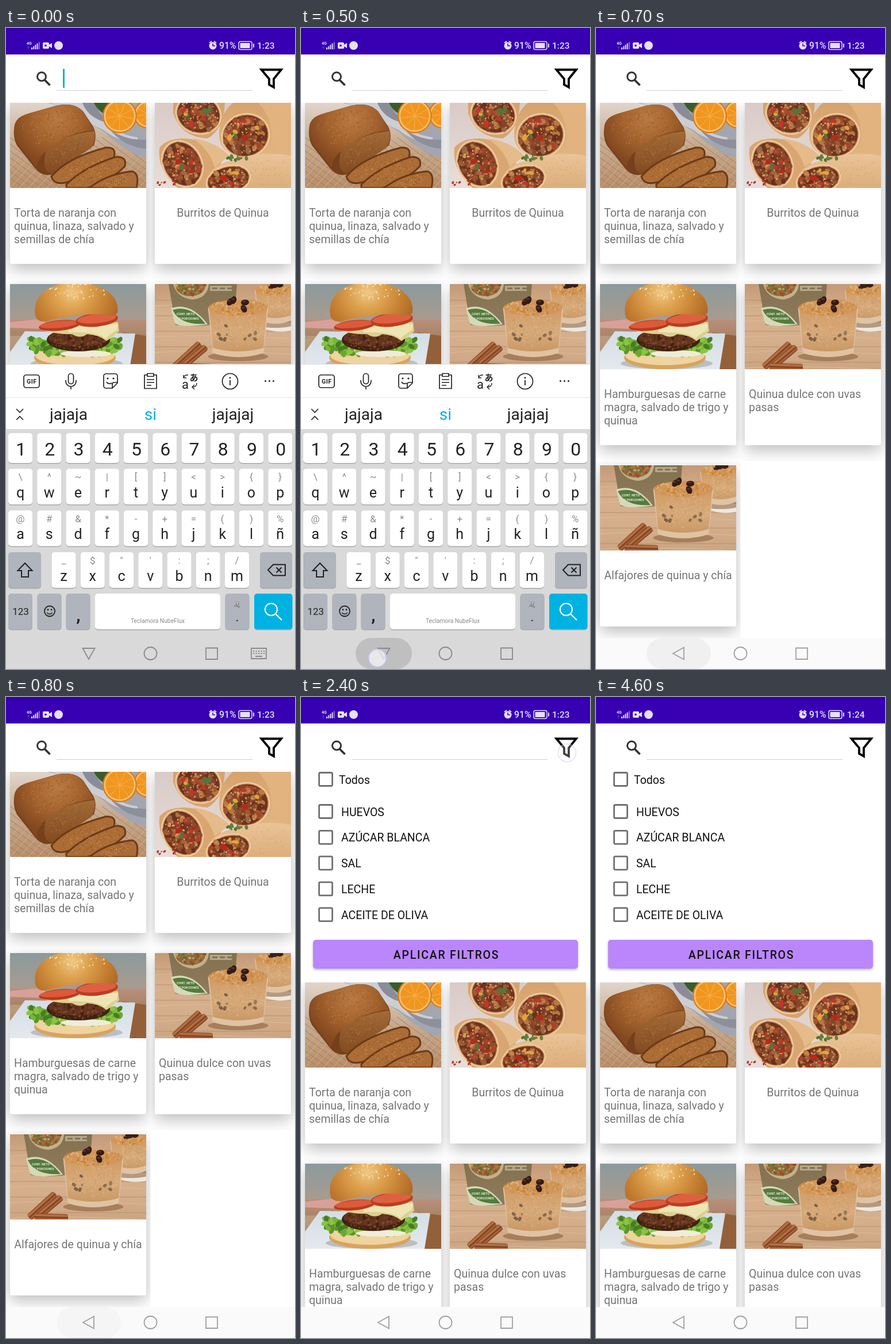
These frames come from a looping animation (503x1114 px, 5000 ms). An HTML page with a canvas:

```html
<!DOCTYPE html>
<html lang="es">
<head>
<meta charset="utf-8">
<title>Recetas</title>
<style>
html, body { margin: 0; width: 100%; height: 100%; overflow: hidden; background: #fff; }
canvas { display: block; width: 503px; height: 1114px; }
</style>
</head>
<body>
<canvas id="stage" width="503" height="1114"></canvas>
<script>
const screen2d = document.getElementById('stage').getContext('2d');
const LOOP = 5000, CYAN = '#00b2e2', INK = '#222';
let g = screen2d;

let seed = 11;
const rand = () => (seed = seed * 16807 % 2147483647) / 2147483647;
const pick = list => list[Math.floor(rand() * list.length)];

function rect(color, x, y, w, h, r = 0) {
  g.fillStyle = color;
  g.beginPath();
  g.roundRect(x, y, w, h, r);
  g.fill();
}
function oval(color, x, y, rx, ry = rx, turn = 0) {
  g.fillStyle = color;
  g.beginPath();
  g.ellipse(x, y, rx, ry, turn, 0, 7);
  g.fill();
}
function ring(color, width, x, y, r) {
  g.strokeStyle = color;
  g.lineWidth = width;
  g.beginPath();
  g.arc(x, y, r, 0, 7);
  g.stroke();
}
function line(path, color = INK, width = 1.7) {
  g.strokeStyle = color;
  g.lineWidth = width;
  g.stroke(new Path2D(path));
}
function shape(path, color) {
  g.fillStyle = color;
  g.fill(new Path2D(path));
}
function text(str, x, y, size, color, align = 'left', weight = 400, spacing = 0) {
  g.font = `${weight} ${size}px Roboto, "Noto Sans CJK JP", sans-serif`;
  g.fillStyle = color;
  g.textAlign = align;
  g.letterSpacing = spacing + 'px';
  g.fillText(str, x, y);
}
function fade(y0, y1, ...colors) {
  const f = g.createLinearGradient(0, y0, 0, y1);
  colors.forEach((c, i) => f.addColorStop(i / (colors.length - 1), c));
  return f;
}
function glow(x, y, r, ...colors) {
  const f = g.createRadialGradient(x, y, 0, x, y, r);
  colors.forEach((c, i) => f.addColorStop(i / (colors.length - 1), c));
  return f;
}
// Scatter small grains inside an ellipse
function grains(n, colors, x, y, rx, ry, size, turn = 0) {
  for (let i = 0; i < n; i++) {
    const a = rand() * 6.283, d = Math.sqrt(rand());
    const u = Math.cos(a) * d * rx, v = Math.sin(a) * d * ry;
    const s = size * (0.5 + rand() * 0.7);
    oval(pick(colors), x + u * Math.cos(turn) - v * Math.sin(turn),
      y + u * Math.sin(turn) + v * Math.cos(turn), s, s * 0.7, rand() * 3);
  }
}

/* ---------- photos, 237 x 148 ---------- */
function photo(paint) {
  const c = document.createElement('canvas');
  c.width = 237;
  c.height = 148;
  g = c.getContext('2d');
  paint();
  g = screen2d;
  return c;
}

function paintBread() {
  rect(fade(0, 148, '#e0d5cb', '#c6a98e', '#b88e69'), 0, 0, 237, 148);
  for (let i = -6; i < 18; i++) {
    line(`M${i * 16} 148L${i * 16 + 90} 50`, '#d3b293', 1);
    line(`M${i * 16} 60L${i * 16 + 120} 148`, '#9a7351', 0.8);
  }
  shape('M66 0H237V94Q214 92 206 82Q180 68 166 52Q136 34 112 12Z', '#a3a6b0');
  shape('M70 0H126Q140 24 172 36Q190 56 222 60V68Q188 68 164 48Q130 32 100 10Z', '#cdced3');
  shape('M126 0H150Q150 18 176 34L160 32Q134 22 126 0Z', '#8a8d98');
  shape('M172 44Q198 66 237 64V80Q196 76 172 44Z', '#8d909b');
  shape('M146 0H180Q174 14 186 26Q156 22 146 0Z', '#3c5b2a');
  for (const [x, y, r] of [[240, 20, 25], [191, 23, 30]]) {
    oval('#df7d14', x, y, r);
    oval('#f5c37a', x, y, r - 2.5);
    oval('#f0961f', x, y, r - 5);
    for (let a = 0.2; a < 6.2; a += 0.7)
      line(`M${x} ${y}l${Math.cos(a) * (r - 5)} ${Math.sin(a) * (r - 5)}`, '#f5b452', 1);
  }
  shape('M8 40Q10 26 28 20L80 5Q112-2 128 16L145 42Q152 56 146 74L74 124Q56 130 42 112L12 74Q4 58 8 40Z', '#75401c');
  shape('M8 38Q14 24 34 18L80 5Q112-2 128 16L147 48Q100 50 62 84Q50 94 46 112L14 72Q5 56 8 38Z',
    glow(82, 28, 80, '#ba7a42', '#a5642f', '#83481f'));
  shape('M62 84Q92 54 147 49Q150 64 142 78L74 123Q54 122 62 84Z', fade(50, 124, '#a26a36', '#824a20'));
  grains(330, ['#bd8350', '#93561f', '#ae6f38', '#9b5f2b'], 76, 42, 60, 29, 1.1, -0.15);
  grains(150, ['#84501f', '#a87441', '#946133'], 102, 86, 38, 18, 1.1, -0.5);
  const slices = [
    ['M72 128Q98 96 166 78Q186 76 181 94Q164 118 100 138Q76 144 72 128Z', 128, 108],
    ['M98 142Q128 112 184 94Q204 93 200 110Q178 134 134 148H98Z', 152, 122],
    ['M138 148Q168 124 212 119Q226 122 220 148Z', 184, 137],
  ];
  slices.forEach(([path, x, y], i) => {
    shape(path, '#ab6c35');
    line(path, '#6c3918', 3);
    grains(150, ['#c18a53', '#925a29', '#b67840'], x, y, i < 2 ? 47 : 34, i < 2 ? 13 : 8, 1.2, -0.4);
  });
}

const FILLING = ['#7a3b20', '#9c5831', '#6a2f1d', '#b97843', '#a8432b', '#9a6744', '#84452a', '#8d4b2b'];
function filled(x, y, rx, ry, turn) {
  oval('#efcb9f', x, y, rx + 4, ry + 4, turn);
  oval('#c98e5b', x, y, rx + 1.5, ry + 1.5, turn);
  oval('#6d351e', x, y, rx, ry, turn);
  grains(90, FILLING, x, y, rx - 3, ry - 3, 6, turn);
  grains(60, ['#c99057', '#b06b3e', '#d8a66b'], x, y, rx - 3, ry - 3, 2, turn);
  grains(7, ['#b8281c', '#c4342a', '#e0a63a', '#55753a'], x, y, rx * 0.75, ry * 0.75, 6, turn);
}
function paintBurritos() {
  rect(fade(0, 148, '#d9cbc7', '#e8ddd8'), 0, 0, 237, 148);
  shape('M32 0H122Q120 46 92 62Q46 60 32 18Z', '#d6a36f');
  filled(76, 20, 37, 31, 0.3);
  shape('M112 54Q112 20 136 0H237V100L160 96Q112 92 112 54Z', fade(0, 100, '#d6a26c', '#e3b683'));
  shape('M180 0H237V84Q212 84 202 70Q208 30 180 0Z', '#e2b37f');
  shape('M8 78Q20 62 52 62Q96 64 120 96L92 148H40Q4 118 8 78Z', '#d9a671');
  shape('M66 62Q104 66 130 92L104 112Q96 82 66 62Z', '#e6bb8a');
  filled(158, 57, 39, 35, -0.3);
  filled(48, 106, 31, 39, -0.5);
  shape('M90 148Q88 112 130 101Q186 82 237 92V148Z', fade(88, 148, '#eac498', '#dcae7b'));
  filled(128, 134, 36, 22, -0.25);
  grains(80, ['#cb9966', '#d9ac7a'], 200, 118, 36, 27, 0.9);
  grains(12, ['#4c7433', '#64803c'], 138, 96, 22, 4, 3.5);
  grains(8, ['#5f7f3b', '#ad3928'], 24, 140, 20, 6, 2.5);
}

function paintBurger() {
  rect(fade(0, 148, '#8b9a9c', '#a39b92', '#b99a7c', '#a87f5c'), 0, 0, 237, 148);
  rect(fade(60, 92, '#b9907c', '#a98367'), 0, 62, 237, 28);
  shape('M196 84L237 90V148H190Z', '#94603a');
  shape('M26 82L218 86L208 148H0V118Z', fade(82, 148, '#d3dde5', '#e4e9ee'));
  shape('M0 66L60 60L62 78L0 76Z', '#d9a097');
  oval('#b9bfc2', 116, 138, 80, 10);
  oval('#d8a45c', 113, 128, 71, 20);
  oval('#efd3a0', 113, 124, 69, 17);
  for (let i = 0; i < 150; i++) {
    const u = rand() * 2 - 1;
    oval(pick(['#5c962b', '#78b638', '#467d21', '#8cc345', '#6aa632']), 112 + u * 80,
      101 + rand() * 23 - u * u * 6, 6, 4, rand() * 3);
  }
  oval('#f0ecd9', 132, 121, 44, 6);
  oval('#40210f', 119, 97, 55, 20);
  oval('#643420', 119, 94, 52, 15);
  grains(150, ['#6d3a22', '#42220f', '#7d4a2b', '#57301b'], 119, 97, 52, 17, 2.6);
  shape('M56 76Q100 64 188 66L190 82Q178 92 168 99Q154 88 134 87Q122 96 108 87Q84 88 56 80Z', '#dcd08e');
  shape('M102 76L188 69L186 80Q172 88 166 95Q152 82 102 84Z', '#eee5b5');
  oval('#b83b20', 86, 72, 36, 9, -0.1);
  oval('#dc5a39', 86, 70, 34, 6, -0.1);
  oval('#bc3d22', 151, 62, 37, 12, -0.1);
  oval('#de6040', 151, 60, 34, 8, -0.1);
  shape('M44 54Q40 30 58 14Q76-2 112-3Q154-3 176 18Q190 32 187 50Q182 57 164 53Q116 50 62 65Q46 66 44 54Z',
    glow(108, 14, 92, '#f0c883', '#dca04d', '#c57f32', '#a96323'));
  grains(60, ['#f5e2b7', '#efd6a0'], 115, 14, 52, 15, 1.6);
}

function glass(x, y, w, h) {
  oval('rgba(135,92,58,.55)', x, y + h, w * 0.5, 8);
  shape(`M${x - w / 2} ${y}H${x + w / 2}L${x + w * 0.42} ${y + h - 6}Q${x} ${y + h + 8} ${x - w * 0.42} ${y + h - 6}Z`, '#dfc3a3');
  shape(`M${x - w * 0.48} ${y}H${x + w * 0.48}L${x + w * 0.42} ${y + h - 15}Q${x} ${y + h - 3} ${x - w * 0.42} ${y + h - 15}Z`,
    fade(y, y + h, '#cf9a63', '#d8ab7b', '#c4935f'));
  oval('#d2965a', x, y, w * 0.49, h * 0.16);
  grains(Math.round(w * 4), ['#dfb98c', '#c99a68', '#d5a877', '#cea06c'], x, y + h * 0.45, w * 0.42, h * 0.36, 1.3);
  grains(Math.round(w * 1.5), ['#c3843f', '#e2ad6e', '#d09452', '#d89f5e'], x, y, w * 0.46, h * 0.15, 2.6);
}
function stick(x, y, length, turn) {
  g.save();
  g.translate(x, y);
  g.rotate(turn);
  rect('#7e4322', -length / 2, -6, length, 12, 4);
  rect('#b36f42', -length / 2, -5, length, 4, 2);
  rect('#a9623a', -length / 2, 1.5, length, 3, 2);
  g.restore();
}
function paintPudding() {
  rect(fade(0, 148, '#c39a77', '#d6b08c', '#d5af8d', '#cca683'), 0, 0, 237, 148);
  for (let y = 28; y < 148; y += 27) {
    line(`M0 ${y}H237`, '#b58d6a', 1);
    line(`M0 ${y + 10}Q90 ${y + 4} 237 ${y + 13}`, '#dcbb99', 1);
  }
  shape('M24 0H143L138 62Q88 78 36 71Z', fade(0, 72, '#83714f', '#8d7b5e'));
  shape('M32 0H94Q92 24 66 27Q38 24 32 0Z', '#c2b18b');
  oval('#8e6c3c', 62, 3, 26, 18);
  grains(55, ['#5c7138', '#b07b39', '#9a4c30', '#c6a36b'], 62, 3, 25, 16, 3);
  rect('#b5a688', 96, 3, 38, 9);
  for (let x = 100; x < 132; x += 13) rect('#827459', x, 6, 9, 3);
  shape('M28 42Q62 30 92 70Q45 77 35 68Z', '#d5d9b8');
  shape('M31 45Q62 35 88 69Q44 72 31 45Z', '#557a3d');
  text('CONT. NETO', 38, 54, 5.5, '#e4ead6', 'left', 700);
  text('2 PORCIONES', 42, 62, 5.5, '#e4ead6', 'left', 700);
  shape('M181 62L237 67V81Q208 86 188 76Z', '#ede8df');
  glass(210, 10, 72, 58);
  grains(5, ['#382018'], 207, 4, 14, 3, 5);
  glass(145, 41, 105, 85);
  grains(10, ['#97785a', '#8a6a4c', '#7d614a'], 143, 86, 38, 22, 3.6);
  for (const [x, y] of [[131, 31], [157, 32], [155, 43], [137, 28]]) {
    oval('#341a15', x, y, 7, 5, x);
    oval('#5d3529', x - 1, y - 2, 3, 1.5);
  }
  stick(56, 124, 62, -0.74);
  stick(68, 127, 56, -0.7);
  stick(72, 144, 58, 0.03);
}

const bread = photo(paintBread), burritos = photo(paintBurritos);
const burger = photo(paintBurger), pudding = photo(paintPudding);
const recipes = [
  [bread, 'Torta de naranja con', 'quinua, linaza, salvado y', 'semillas de chía'],
  [burritos, 'Burritos de Quinua'],
  [burger, 'Hamburguesas de carne', 'magra, salvado de trigo y', 'quinua'],
  [pudding, 'Quinua dulce con uvas', 'pasas'],
  [pudding, 'Alfajores de quinua y chía'],
];

/* ---------- app ---------- */
function statusBar(clock) {
  const c = '#e6dff5';
  rect('#3700b3', 0, 0, 503, 46);
  text('4G', 36, 29, 7, c, 'left', 700);
  text('↑↓', 36, 37, 6, '#9f86d6');
  for (let i = 0; i < 5; i++) rect(i < 4 ? c : '#8d70d0', 44 + i * 3.2, 34 - i * 2.4, 2, 3 + i * 2.4);
  rect(c, 64, 25, 11, 11, 2);
  shape('M75 29l5-3v9l-5-3z', c);
  oval('#3700b3', 69, 30.5, 1.8);
  oval(c, 91.5, 30.5, 7.5);
  oval(c, 360, 31, 6.5);
  line('M354 26l4-3M366 26l-4-3', c, 2);
  line('M360 27v4h4', '#3700b3', 1.5);
  text('91%', 371, 36, 15.8, c, 'left', 500);
  g.strokeStyle = c;
  g.lineWidth = 1.5;
  g.beginPath();
  g.roundRect(405, 23.5, 23, 14, 3);
  g.stroke();
  rect(c, 407.5, 26, 17, 9, 1);
  rect(c, 430, 27, 2, 7, 1);
  text(clock, 437, 36, 15.5, c, 'left', 500);
}

function searchRow(cursor) {
  ring('#333', 3, 62, 84.5, 7.5);
  line('M67 90l9.5 9.5', '#333', 3.8);
  rect('#cfcfcf', 88, 108, 341, 1);
  if (cursor) rect('#18b0ce', 99, 71, 3, 33);
  line('M444.5 72.5H479L466 88.5V103L458 98.5V88.5Z', '#000', 3.8);
}

function card(i, top) {
  const x = i % 2 ? 259 : 7, y = top + Math.floor(i / 2) * 315;
  const [image, ...lines] = recipes[i];
  g.save();
  g.beginPath();
  g.rect(i % 2 ? 251.5 : 0, y - 7, 251.5, 315);
  g.clip();
  g.shadowColor = 'rgba(0,0,0,.27)';
  g.shadowBlur = 28;
  g.shadowOffsetY = 9;
  rect('#fff', x, y, 237, 280, 3);
  g.shadowColor = 'transparent';
  g.drawImage(image, x, y);
  lines.forEach((s, n) => lines.length > 1
    ? text(s, x + 7, y + 197.5 + n * 23, 19.5, '#757575')
    : text(s, x + 118.5, y + 197.5, 19.5, '#757575', 'center'));
  g.restore();
}
function list(top) {
  g.save();
  g.beginPath();
  g.rect(0, top, 503, 1060 - top);
  g.clip();
  recipes.forEach((_, i) => card(i, top));
  g.restore();
}

function checkbox(label, x, y) {
  g.strokeStyle = '#707070';
  g.lineWidth = 2.8;
  g.beginPath();
  g.roundRect(31.5, y - 11.5, 23, 23, 2);
  g.stroke();
  text(label, x, y + 7.5, 19.5, '#111');
}
function filters() {
  checkbox('Todos', 66, 143);
  ['HUEVOS', 'AZÚCAR BLANCA', 'SAL', 'LECHE', 'ACEITE DE OLIVA']
    .forEach((s, i) => checkbox(s, 70, 199 + i * 44.8));
  g.save();
  g.shadowColor = 'rgba(0,0,0,.3)';
  g.shadowBlur = 4;
  g.shadowOffsetY = 2;
  rect('#bb86fc', 21, 422, 461, 50, 5);
  g.restore();
  text('APLICAR FILTROS', 253, 454.5, 19.5, '#111', 'center', 500, 1.75);
}

/* ---------- keyboard ---------- */
function key(x, y, w, h, color = '#fff') {
  rect('#a6a8ab', x, y + 1.5, w, h, 5);
  rect(color, x, y, w, h, 5);
}
function letterRow(x, y, letters, hints) {
  [...letters].forEach((ch, i) => {
    const left = x + i * 50.25;
    key(left, y, 42, 62);
    text(hints[i], left + 21, y + 20, 17, '#8c8c8c', 'center');
    text(ch, left + 21, y + 49.5, 25, INK, 'center');
  });
}
function toolbar() {
  g.strokeStyle = INK;
  g.lineWidth = 1.7;
  g.beginPath();
  g.roundRect(31, 603, 27, 22, 4);
  g.stroke();
  text('GIF', 44.8, 618, 10.5, INK, 'center', 700, 0.6);
  line('M108.5 605a4.5 4.5 0 0 1 9 0v9a4.5 4.5 0 0 1-9 0zM104 612v2a9 9 0 0 0 18 0v-2M113 623v5');
  line('M174 601h16a4 4 0 0 1 4 4v12l-9 9h-11a4 4 0 0 1-4-4v-17a4 4 0 0 1 4-4zM194 616h-6a3 3 0 0 0-3 3v7M175 615a6 6 0 0 0 9 2');
  oval(INK, 177, 609, 1.6);
  oval(INK, 187, 609, 1.6);
  line('M245.5 603h-4.5v23.5h21v-23.5h-4.5M246 600.5h11v5h-11z');
  line('M245 611h13M245 616h13M245 621h8', INK, 1.3);
  text('a', 312, 627, 22, INK, 'center');
  text('あ', 327, 613, 15, INK, 'center', 700);
  line('M309 608q1-5 8-5M309 603v5h5M332 617q0 7-8 7M328 620l-4 4 4 4', INK, 1.4);
  ring(INK, 1.7, 390, 614, 13.5);
  line('M390 612v9', INK, 1.8);
  oval(INK, 390, 608, 1.4);
  for (const x of [451.5, 458.5, 465.5]) oval(INK, x, 613.5, 1.5);
}
function keyboard(dy) {
  g.save();
  g.translate(0, dy);
  rect('#fff', 0, 585, 503, 112);
  rect('#e0e0e0', 0, 584, 503, 1);
  rect('#e4e4e4', 0, 642, 503, 1);
  rect('#d9d9d9', 0, 697, 503, 417);
  toolbar();
  line('M18 662l6 6 6-6M18 681l6-6 6 6', INK, 1.6);
  text('jajaja', 109, 681, 28, INK, 'center');
  text('si', 251.5, 681, 28, CYAN, 'center');
  text('jajajaj', 395, 681, 28, INK, 'center');

  [...'1234567890'].forEach((n, i) => {
    key(4 + i * 50.25, 704, 42, 52);
    text(n, 26 + i * 50.25, 743, 32, INK, 'center');
  });
  letterRow(4, 766, 'qwertyuiop', '\\^~|[]<>{}');
  letterRow(4, 838.5, 'asdfghjklñ', '@#&*-+=()%');
  letterRow(79.5, 911, 'zxcvbnm', '_$"\':;/');

  const gray = '#b0b4bc';
  key(4, 911, 57, 62, gray);
  key(442, 911, 56, 62, gray);
  line('M33 930l12.5 13h-6.5v11h-12v-11h-6.5z', INK, 2);
  line('M456 942l9-9.5h21v19h-21zM470.5 937.5l9 9M479.5 937.5l-9 9', INK, 2);
  for (const x of [4, 54.5, 104.5, 381.5]) key(x, 983, 42, 62, gray);
  key(155, 983, 218, 62);
  key(432, 983, 66.5, 62, CYAN);
  text('123', 25.5, 1020, 17, INK, 'center');
  ring(INK, 1.8, 76, 1013.5, 9);
  line('M71 1016q5 5 10 0', INK, 1.5);
  oval(INK, 73, 1011, 1.4);
  oval(INK, 79, 1011, 1.4);
  text(',', 126, 1031, 30, INK, 'center', 700);
  text(',¡¿', 402.5, 1004, 12, '#666', 'center');
  text('.', 402.5, 1031, 22, INK, 'center');
  text('Teclamora NubeFlux', 264, 1034, 10.3, '#8a8a8a', 'center');
  ring('#fff', 2, 461.5, 1010.5, 10.5);
  line('M469 1018l11 11', '#fff', 2.2);
  g.restore();
}

/* ---------- system navigation and touches ---------- */
function navBar(turn, color, keyboardIcon) {
  g.save();
  g.translate(144, 1087);
  g.rotate(turn);
  line('M-10 0L9-10.5V10.5Z', color, 1.8);
  g.restore();
  ring(color, 1.8, 251.5, 1087, 11);
  line('M348 1077.5h20v19.5h-20z', color, 1.8);
  if (!keyboardIcon) return;
  line('M427 1078h26v18h-26z', color, 1.8);
  for (let y = 1082; y < 1090; y += 4)
    for (let x = 430; x < 450; x += 4.5) rect(color, x, y, 2.3, 2);
  rect(color, 434, 1091, 12, 2);
}
function ripple(width, alpha) {
  rect(`rgba(0,0,0,${alpha})`, 144 - width / 2, 1060, width, 54, 27);
}
function touch(x, y, alpha) {
  g.save();
  g.globalAlpha = alpha;
  oval('rgba(255,255,255,.65)', x, y, 16);
  ring('#c4c2ec', 2, x, y, 15.5);
  g.restore();
}

function draw(t) {
  const typing = t < 600, filtering = t >= 2400;
  rect('#fff', 0, 0, 503, 1114);
  list(filtering ? 496 : 130);
  if (filtering) filters();
  statusBar(t < 4600 ? '1:23' : '1:24');
  searchRow(t < 400);

  if (t < 700) keyboard(typing ? 0 : 430);
  else rect('#fafafa', 0, 1060, 503, 54);

  if (t >= 400 && t < 500) ripple(60, 0.06);
  else if (t >= 500 && t < 600) ripple(98, 0.12);
  else if (t >= 600 && t < 700) ripple(112, 0.06);
  else if (t >= 700 && t < 2200) ripple(112, t < 800 ? 0.04 : 0.018);

  const turn = typing ? -Math.PI / 2 : t < 700 ? -0.26 : 0;
  navBar(turn, typing ? '#8a8a8a' : '#a0a0a0', t < 500);

  if (t >= 400 && t < 600) touch(133, 1095, 1);
  else if (t >= 600 && t < 700) touch(133, 1095, 0.2);
  if (t >= 2200 && t < 2400) touch(463, 97, 1);
  else if (t >= 2400 && t < 2500) touch(463, 97, 0.4);
}

const start = performance.now();
function tick() {
  draw((performance.now() - start) % LOOP);
  requestAnimationFrame(tick);
}
tick();
</script>
</body>
</html>
```
